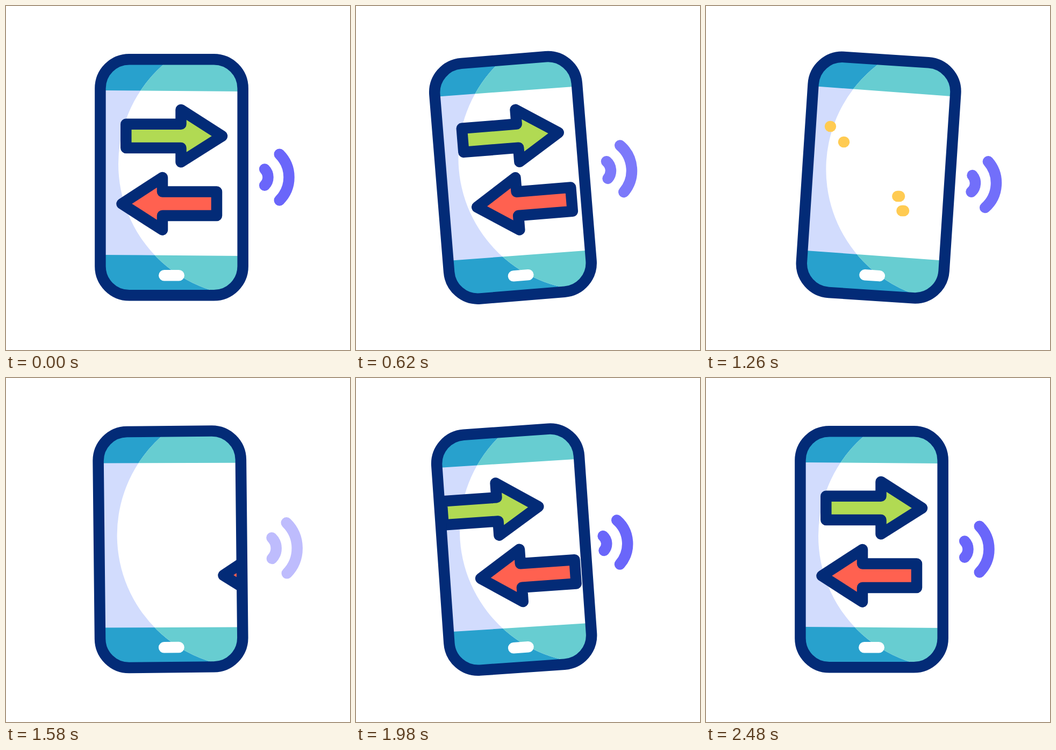
Recreate the animation shown at these times as an HTML page. Size 640x640 px, loop 3.2 s.

```html
<!DOCTYPE html>
<html lang="en">
<head>
<meta charset="utf-8">
<title>Data transfer</title>
<style>
  html, body { margin: 0; height: 100%; overflow: hidden; background: #fff; }
  svg { display: block; width: 100%; height: 100%; }
  .line { fill: none; stroke-width: 20.5; stroke-linecap: round; stroke-linejoin: round; }
  .navy { stroke: #032b77; }
</style>
</head>
<body>
<svg viewBox="0 0 640 640">
  <defs>
    <clipPath id="screen"><rect x="180" y="104" width="256" height="430" rx="49"/></clipPath>
    <clipPath id="light"><circle cx="455" cy="294" r="246"/></clipPath>
  </defs>
  <g id="phone">
    <g clip-path="url(#screen)">
      <path fill="#d2dcfd" d="M175 99H441V539H175Z"/>
      <path fill="#28a1cd" d="M175 99H441V159L175 157ZM175 463L441 465V539H175Z"/>
      <g clip-path="url(#light)">
        <path fill="#fff" d="M175 99H441V539H175Z"/>
        <path fill="#67cdd1" d="M175 99H441V159L175 157ZM175 463L441 465V539H175Z"/>
      </g>
      <path id="send" class="line navy" style="fill:#b1da53" d="M223.3 219.8H325.5V193L402 242L325.5 290.3V264H223.3Z"/>
      <path id="receive" class="line navy" style="fill:#ff6150" d="M392 345.5H291V319L215.5 368L291 416.5V390H392Z"/>
    </g>
    <path class="line" stroke="#fff" d="M294.3 501.2H321.7"/>
    <rect class="line navy" x="175.4" y="99.2" width="265.3" height="439" rx="54"/>
    <path id="waves" class="line" stroke="#6a66fa"/>
  </g>
  <g id="trails" class="line" stroke="#ffcb52"></g>
</svg>
<script>
const LOOP = 3200;
const $ = id => document.getElementById(id);
const phase = (t, start, length) => Math.min(1, Math.max(0, (t - start) / length));
const mix = (a, b, k) => a + (b - a) * k;
const quadOut = k => 1 - (1 - k) ** 2;
const backIn = k => 2.7 * k ** 3 - 1.7 * k ** 2;

// time, angle
const swing = [[200, 0], [711, -5], [1300, 3.85], [1860, -5], [2270, 0]];

// y, start x, end x, delay
const trails = [[224, 335, 231, 0], [253, 370, 256, 0], [354, 278, 360, 50], [381, 288, 368, 50]];
const trailPaths = trails.map(() =>
  $('trails').appendChild(document.createElementNS('http://www.w3.org/2000/svg', 'path')));

function angleAt(t) {
  let angle = 0;
  swing.slice(1).forEach(([end, to], i) => {
    const [start, from] = swing[i];
    if (t >= start) angle = mix(from, to, (1 - Math.cos(Math.PI * phase(t, start, end - start))) / 2);
  });
  return angle;
}

// Arrow leaves with a short pull back, then slides in again from the far side.
const arrowShift = (t, leave, enter) => t < 1400
  ? 250 * backIn(phase(t, 200, leave))
  : -250 * (1 - phase(t, enter, 913)) ** 3;

function waveState(t) {
  if (t < 1040) {
    const k = phase(t, 200, 840) ** 3;
    return [1.15 * k, 1 - k];
  }
  if (t < 1720) {
    const k = phase(t, 1040, 680);
    return [mix(-0.5, 1.15, k), Math.min(1, k * 8) * (1 - k ** 2.5)];
  }
  const k = phase(t, 1720, 760);
  return [mix(-0.5, 0, k), Math.min(1, k * 8)];
}

function arc(cx, r) {
  const d = r * Math.SQRT1_2;
  return `M${cx + d} ${318.6 - d}A${r} ${r} 0 0 1 ${cx + d} ${318.6 + d}`;
}

function draw(now) {
  const t = now % LOOP;
  $('phone').setAttribute('transform', `rotate(${angleAt(t)} 308 518)`);
  $('send').setAttribute('transform', `translate(${arrowShift(t, 680, 1577)})`);
  $('receive').setAttribute('transform', `translate(${-arrowShift(t, 835, 1502)})`);

  const [spread, opacity] = waveState(t);
  const cx = 466 + 14 * spread;
  $('waves').setAttribute('d', arc(cx, 21.5 + 7.3 * spread) + arc(cx, 60.5 + 7.3 * spread));
  $('waves').setAttribute('opacity', opacity);

  trails.forEach(([y, from, to, delay], i) => {
    const head = phase(t, 800 + delay, 260);
    const tail = phase(t, 880 + delay, 420);
    const visible = head > 0 && tail < 1;
    trailPaths[i].setAttribute('d', visible
      ? `M${mix(from, to, quadOut(tail))} ${y}H${mix(from, to, quadOut(head))}` : '');
  });
  requestAnimationFrame(draw);
}
requestAnimationFrame(draw);
</script>
</body>
</html>
```
